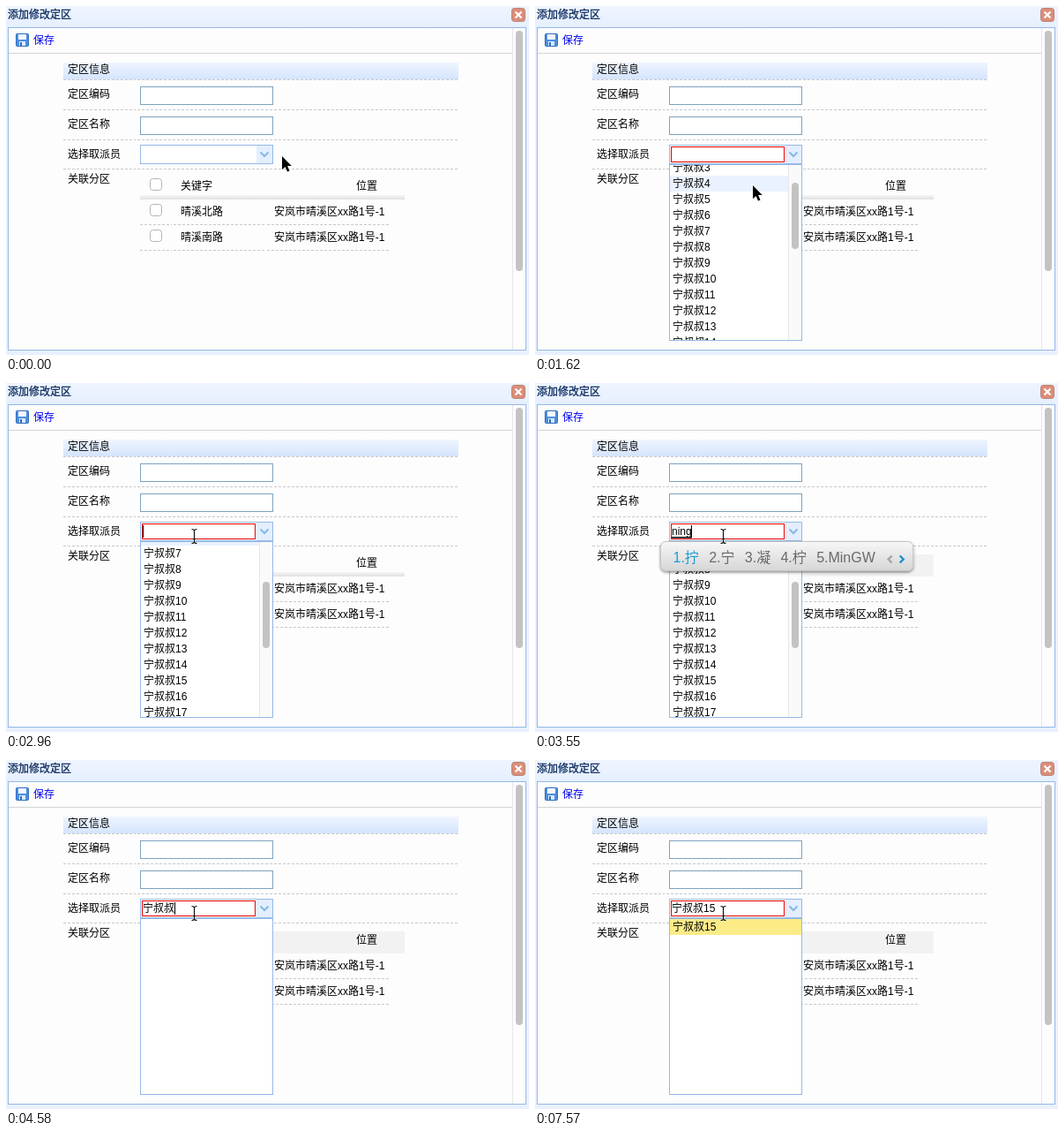
An HTML page that plays this animation: 593 px wide and 395 px high, repeating every 8 s.

```html
<!DOCTYPE html>
<html lang="zh-CN">
<head>
<meta charset="utf-8">
<style>
  html, body { margin: 0; width: 100%; height: 100%; overflow: hidden; background: #e9f1ff; }
  svg { display: block; }
  text { font: 12px "Liberation Sans", "Noto Sans CJK SC", "Noto Sans CJK", sans-serif; white-space: pre; }
  #ime text { font-size: 16px; fill: #6a6a6a; }
  #ime tspan:first-child { fill: #1c9ad6; }
</style>
</head>
<body>
<svg width="593" height="395" viewBox="0 0 593 395">
  <defs>
    <linearGradient id="titleFill" x2="0" y2="1"><stop stop-color="#eff5ff"/><stop offset="1" stop-color="#e5efff"/></linearGradient>
    <linearGradient id="sectionFill" x2="0" y2="1"><stop stop-color="#eff5ff"/><stop offset="1" stop-color="#d4e4fd"/></linearGradient>
    <linearGradient id="stripFill" x2="0" y2="1"><stop stop-color="#f6f6f6"/><stop offset="1" stop-color="#e0e0e0"/></linearGradient>
    <linearGradient id="imeFill" x2="0" y2="1"><stop stop-color="#f7f7f7"/><stop offset="1" stop-color="#d6d6d6"/></linearGradient>
    <filter id="shadow" x="-10%" y="-30%" width="120%" height="180%"><feDropShadow dx="0" dy="1.5" stdDeviation="1.8" flood-opacity=".45"/></filter>
    <clipPath id="listClip"><rect x="153" y="180" width="149" height="198"/></clipPath>
  </defs>

  <rect width="593" height="25" fill="url(#titleFill)"/>
  <text x="2" y="14" fill="#0e2d5f" stroke="#0e2d5f" stroke-width=".3">添加修改定区</text>
  <rect x="573.5" y="2.5" width="15" height="15" rx="3" fill="#dc8d78" stroke="#b98478"/>
  <path d="M577.5 6.5l7 7m0-7l-7 7" stroke="#fff" stroke-width="2.2"/>
  <rect x="2.5" y="24.5" width="587" height="365" fill="#fdfdfd" stroke="#95b8e7"/>
  <path d="M3 53.5H574" stroke="#d4d4d4"/>
  <path d="M574.5 25V389" stroke="#e6e6e6"/>
  <rect x="578" y="28" width="8" height="272" rx="4" fill="#c3c3c3"/>

  <rect x="11.5" y="31.5" width="14" height="14" rx="1" fill="#4b8fe0" stroke="#2f6cbd"/>
  <path d="M14 32h9v6h-9z" fill="#f3f8ff"/>
  <path d="M15 40h7v5h-7z" fill="#dceaff"/>
  <path d="M16 41h2v4h-2z" fill="#2f6cbd"/>
  <text x="31" y="43" fill="#0000ee">保存</text>

  <rect x="65" y="64" width="448" height="19" fill="url(#sectionFill)"/>
  <g id="form"></g>

  <rect id="tableHead" x="152" width="300"/>
  <g id="table"></g>

  <rect x="152.5" y="157.5" width="150" height="21" fill="#fff" stroke="#95b8e7"/>
  <rect x="284" y="158" width="18" height="20" fill="#e3eeff"/>
  <path d="M288.5 165.5l4.5 4.5l4.5-4.5" fill="none" stroke="#83b9e4" stroke-width="2"/>
  <rect id="focus" x="154.5" y="159.5" width="128" height="17" fill="#fff" stroke="#e60000"/>
  <text id="value" x="155" y="172"></text>
  <path id="underline" stroke="#000" stroke-width="1.5"/>
  <path id="caret" stroke="#000"/>

  <g id="list">
    <rect x="152.5" y="179.5" width="150" height="199" fill="#fff" stroke="#95b8e7"/>
    <g clip-path="url(#listClip)">
      <rect id="activeRow" x="153" width="149" height="18"/>
      <g id="rows"></g>
      <g id="scrollbar">
        <rect x="287" y="180" width="15" height="198" fill="#fafafa"/>
        <path d="M287.5 180V378" stroke="#e6e6e6"/>
        <rect id="thumb" x="291" width="8" height="75" rx="4" fill="#c3c3c3"/>
      </g>
    </g>
  </g>

  <g id="ime">
    <rect x="142.5" y="179.5" height="33" rx="6" fill="url(#imeFill)" stroke="#c4c4c4" filter="url(#shadow)"/>
    <text x="156.5" y="203"></text>
    <g id="pager" fill="none" stroke-width="2.4">
      <path d="M5 195.5l-4 4l4 4" stroke="#a5a5a5"/>
      <path d="M14 195.5l4 4l-4 4" stroke="#1c8fd0"/>
    </g>
  </g>

  <path id="arrow" d="M0 0V15.2L3.5 12L6 17.6L8.5 16.5L6.1 11H10.8Z" stroke="#fff" stroke-width="1.4" paint-order="stroke"/>
  <g id="beam" fill="none">
    <path d="M-3-7.5Q0-7.5 0-5.5Q0-7.5 3-7.5M0-6V7M-3 8.5Q0 8.5 0 6.5Q0 8.5 3 8.5M-2 3.5H2" stroke="#fff" stroke-width="2.6" opacity=".7"/>
    <path d="M-3-7.5Q0-7.5 0-5.5Q0-7.5 3-7.5M0-6V7M-3 8.5Q0 8.5 0 6.5Q0 8.5 3 8.5M-2 3.5H2" stroke="#111" stroke-width="1.2"/>
  </g>
</svg>
<script>
const LOOP = 8000, NAME = '宁叔叔', ROW = 18, LIST_TOP = 180;
const $ = id => document.getElementById(id);
const set = (el, attrs) => { for (const k in attrs) el.setAttribute(k, attrs[k]); };
const show = (el, on) => el.setAttribute('display', on ? 'inline' : 'none');
const label = (x, y, s) => `<text x="${x}" y="${y}">${s}</text>`;
const box = (x, y, w, h, extra) => `<rect x="${x}" y="${y}" width="${w}" height="${h}" fill="#fff" ${extra}/>`;
const dashes = (y, ...spans) => spans.map(([a, b]) =>
  `<path d="M${a} ${y}H${b}" stroke="#c9c9c9" stroke-dasharray="3 2"/>`).join('');

$('form').innerHTML =
  ['定区信息', '定区编码', '定区名称', '选择取派员', '关联分区']
    .map((s, i) => label(70, [76, 104, 138, 172, 200][i], s)).join('') +
  [83.5, 117.5, 151.5, 184.5].map(y => dashes(y, [65, 147], [149, 513])).join('') +
  [91.5, 125.5].map(y => box(152.5, y, 150, 20, 'stroke="#7fa3bd"')).join('');

$('table').innerHTML =
  label(198, 208, '关键字') + label(397, 208, '位置') +
  [195.5, 224.5, 253.5].map(y => box(163.5, y, 13, 13, 'rx="3" stroke="#b4b4b4"')).join('') +
  ['晴溪北路', '晴溪南路'].map((road, i) => {
    const y = 237 + 29 * i;
    return label(198, y, road) + label(304, y, '安岚市晴溪区xx路1号-1') +
      dashes(y + 10.5, [152, 188], [190, 294], [296, 434]);
  }).join('');

// Timelines: [start, ...values]; the latest started entry applies.
const at = (track, t) => track.filter(e => e[0] <= t).pop();

const pointer = [
  [0, 313, 170], [140, 310, 167], [290, 308, 165], [590, 298, 165], [730, 289, 164],
  [1320, 271, 210], [1470, 262, 206], [1620, 247, 203], [1770, 233, 199], [1910, 221, 191],
  [2060, 212, 182], [2210, 212, 181], [2360, 212, 173], [2660, 213.5, 173]
];
const scrolling = [[0, 0], [1470, 10], [1620, 42], [1770, 76], [1910, 97], [2060, 104], [4580, 0]];
const typing = [
  [0, ''], [3260, 'n'], [3410, 'nin'], [3550, 'ning'], [3840, 'nings'], [3990, 'ningshus'],
  [4140, 'ningshushu'], [4580, NAME], [5630, NAME + '1'], [7120, NAME + '15']
];
const candidates = [
  [3260, '你 你们 那 那么 年 能'], [3410, '您 您好 恁 您们 宁'], [3550, '拧 宁 凝 柠 MinGW'],
  [3840, '拧上 宁 凝是 柠 拧 宁上'], [3990, '宁叔 凝书 拧 宁 柠数'],
  [4140, NAME + ' 凝叔叔 拧书 宁 拧'], [4580, '']
];
const blinking = [
  [0, 0], [1030, 1], [1470, 0], [2060, 1], [2510, 0], [2960, 1],
  [5180, 0], [5630, 1], [6080, 0], [6680, 1], [7570, 0]
];
const range = (a, b) => Array.from({ length: b - a + 1 }, (_, i) => a + i);
const results = [
  [0, range(1, 29)], [3840, []], [4880, range(1, 29)], [5780, [1, ...range(10, 19)]], [7270, [15]]
];

let shownIme = null;
function drawIme(words) {
  show($('ime'), words);
  if (!words || words === shownIme) return;
  shownIme = words;
  const text = $('ime').querySelector('text');
  text.innerHTML = words.split(' ')
    .map((w, i) => `<tspan${i ? ' dx="11.3"' : ''}>${i + 1}.${w}</tspan>`).join('');
  const b = text.getBBox(), end = b.x + b.width;
  $('ime').querySelector('rect').setAttribute('width', end + 42 - 142.5);
  set($('pager'), { transform: `translate(${end + 13} 0)` });
}

function drawList(t, x, y) {
  show($('list'), t >= 1030);
  const items = at(results, t)[1], scroll = at(scrolling, t)[1];
  $('rows').innerHTML = items.map((n, i) => label(156, LIST_TOP + 13 + ROW * i - scroll, NAME + n)).join('');
  show($('scrollbar'), items.length > 11);
  $('thumb').setAttribute('y', 183 + scroll * .404);

  const picked = t >= 5780, hovered = t >= 1320 && t < 3840;
  const row = picked ? 0 : Math.floor((Math.max(y, LIST_TOP + 2) - LIST_TOP + scroll) / ROW);
  show($('activeRow'), picked || hovered);
  set($('activeRow'), { y: LIST_TOP + row * ROW - scroll, fill: picked ? '#fbec88' : '#eaf2ff' });
}

function drawInput(t) {
  const value = $('value'), typed = at(typing, t)[1];
  value.textContent = typed;
  const end = 155 + (typed ? value.getComputedTextLength() : 0);
  const composing = t >= 3260 && t < 4580;
  show($('focus'), t >= 1030);
  show($('underline'), composing);
  set($('underline'), { d: `M155 174.8H${end}` });
  show($('caret'), at(blinking, t)[1]);
  set($('caret'), { d: `M${Math.floor(end) + .5} 161V175` });
}

function draw(t) {
  const [, x, y] = at(pointer, t), beam = t >= 2360;
  const grey = t >= 3260;
  set($('tableHead'), grey
    ? { y: 194, height: 25, fill: '#f2f2f2' }
    : { y: 214, height: 5, fill: 'url(#stripFill)' });
  drawInput(t);
  drawList(t, x, y);
  drawIme((at(candidates, t) || [0, ''])[1]);
  show($('arrow'), !beam);
  show($('beam'), beam);
  set($(beam ? 'beam' : 'arrow'), { transform: `translate(${x} ${y})` });
}

const start = performance.now();
function tick() {
  draw((performance.now() - start) % LOOP);
  requestAnimationFrame(tick);
}
tick();
</script>
</body>
</html>
```
